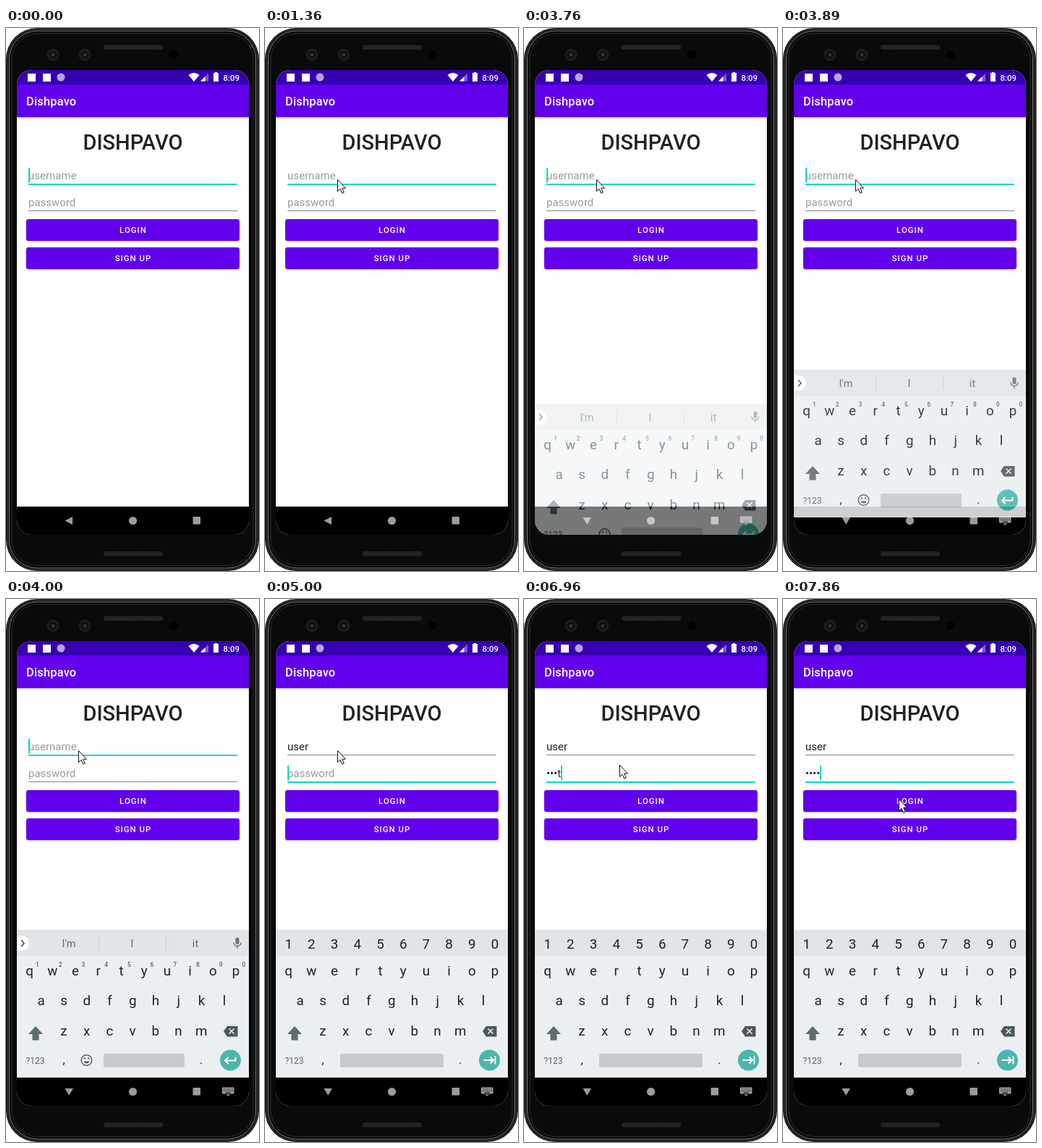
An HTML page for the animation above (8 s loop, 350 by 750 pixels).

```html
<!DOCTYPE html>
<html lang="en">
<head>
<meta charset="utf-8">
<title>Login screen</title>
<style>
  html, body { margin: 0; width: 100%; height: 100%; overflow: hidden; background: #fff; }
  svg { display: block; width: 350px; height: 750px; font-family: Roboto, "Noto Sans", sans-serif; }
  .mid { text-anchor: middle; }
  .medium { font-weight: 500; }
  .field { font-size: 15px; fill: #212121; white-space: pre; }
  .hint { fill: #9b9b9b; }
  .button rect { fill: #6200ee; filter: drop-shadow(0 1px .8px rgba(0, 0, 0, .26)); }
  .button text { fill: #fff; font-size: 11.4px; font-weight: 500; letter-spacing: 1.02px; text-anchor: middle; }
  .key { font-size: 18.8px; fill: #14262e; text-anchor: middle; }
  .sup { font-size: 8.5px; fill: #566268; text-anchor: middle; font-weight: 500; }
  .word { font-size: 14.5px; fill: #5f6a70; text-anchor: middle; }
</style>
</head>
<body>
<svg viewBox="0 0 350 750">
  <defs>
    <clipPath id="screen"><rect x="15" y="58" width="321" height="642" rx="20"/></clipPath>
    <pattern id="mesh" width="3" height="3" patternUnits="userSpaceOnUse">
      <rect width="3" height="3" fill="#151515"/>
      <circle cx=".8" cy=".8" r=".7" fill="#444"/>
      <circle cx="2.3" cy="2.3" r=".7" fill="#383838"/>
    </pattern>
    <linearGradient id="shade" x2="0" y2="1">
      <stop stop-opacity=".25"/>
      <stop offset="1" stop-opacity="0"/>
    </linearGradient>
    <g id="lens">
      <circle r="8.5" fill="#1d1d1d"/>
      <circle r="5.5" fill="#111"/>
      <circle r="2.2" fill="#343434"/>
    </g>
  </defs>

  <!-- Phone body -->
  <rect width="350" height="750" rx="43" fill="#151515"/>
  <rect x="2" y="1.5" width="346" height="747" rx="41" fill="none" stroke="#3c3c3c"/>
  <rect x="4.5" y="4" width="341" height="742" rx="39" fill="#0b0b0b" stroke="#747474"/>
  <rect x="8" y="7.5" width="334" height="735" rx="36" fill="#0a0a0a" stroke="#2c2c2c"/>
  <rect x="135" y="23.5" width="82" height="6.5" rx="3" fill="url(#mesh)"/>
  <rect x="135" y="723" width="82" height="6.5" rx="3" fill="url(#mesh)"/>
  <use href="#lens" x="65" y="37"/>
  <use href="#lens" x="109" y="37"/>
  <circle cx="232" cy="37" r="6" fill="#010101"/>

  <g clip-path="url(#screen)">
    <rect x="15" y="58" width="321" height="642" fill="#fefefe"/>
    <rect x="15" y="123" width="321" height="3" fill="url(#shade)"/>
    <rect x="15" y="58" width="321" height="20" fill="#3700b3"/>
    <rect x="15" y="78" width="321" height="45" fill="#6200ee"/>

    <!-- Status bar -->
    <g fill="#fff">
      <rect x="30" y="63" width="11" height="11"/>
      <rect x="51" y="63" width="11" height="11"/>
      <circle cx="76" cy="68" r="5.5" fill="#b5a3dc"/>
      <path d="M252.5 65Q260 59 267.5 65L260 74Z"/>
      <path d="M280 62.5V73.5H269Z" opacity=".35"/>
      <path d="M275.5 67V73.5H269Z"/>
      <path d="M289 62V61h3v1h2v12h-7V62Z"/>
      <text x="300.500" y="72.500" class="medium" font-size="11.4">8:09</text>
    </g>
    <text x="28" y="107" class="medium" font-size="16.4" letter-spacing=".2" fill="#fff">Dishpavo</text>
    <text x="175.500" y="168" class="medium mid" font-size="29" fill="#212121">DISHPAVO</text>

    <!-- Form -->
    <text id="user" class="field" x="31" y="209"></text>
    <text id="pass" class="field" x="31" y="246"></text>
    <rect id="userLine" x="31" width="289"/>
    <rect id="passLine" x="31" width="289"/>
    <rect id="caret" width="2" height="20.500" fill="#03dac5"/>
    <g class="button">
      <rect x="28" y="264" width="295" height="30" rx="3.300"/>
      <text x="176" y="283">LOGIN</text>
      <rect x="28" y="303" width="295" height="30" rx="3.300"/>
      <text x="176" y="322.300">SIGN UP</text>
    </g>

    <!-- Navigation bar -->
    <rect x="15" y="661" width="321" height="39"/>
    <g fill="#9c9c9c">
      <path id="back"/>
      <circle cx="175.500" cy="680.500" r="5.600"/>
      <rect x="258.500" y="675" width="10.500" height="10.500" rx=".8"/>
      <g id="switcher">
        <rect x="299" y="674.500" width="16.500" height="9" rx="1.200"/>
        <path d="M304.500 684.500h5.500l-2.750 2.300Z"/>
        <path d="M301 677h13M301 679.500h13" stroke="#000" stroke-width="1.200" stroke-dasharray="1.400 1.400"/>
        <path d="M303.500 682h7.500" stroke="#000" stroke-width="1"/>
      </g>
    </g>

    <!-- The keyboard fades in over the navigation bar and rests above it -->
    <g id="keyboard">
      <rect x="15" y="457" width="321" height="204" fill="#ebeff2"/>
      <rect x="15" y="457" width="321" height="36" fill="#e1e5e8"/>
      <g id="letters"></g>

      <g id="textMode">
        <path d="M15 465H21.500a10.500 10.500 0 0 1 0 21H15Z" fill="#fff"/>
        <path d="M21 471l4 4.500-4 4.500" fill="none" stroke="#37474f" stroke-width="1.500"/>
        <path d="M128.500 466v19M221.500 466v19" stroke="#c6cbce"/>
        <g id="words"></g>
        <rect x="317.500" y="467.500" width="5" height="9.500" rx="2.500" fill="#6b767c"/>
        <path d="M315 474.500a5 5 0 0 0 10 0M320 479.500v3.500" fill="none" stroke="#6b767c" stroke-width="1.400"/>
        <g id="sups"></g>
        <circle cx="111.500" cy="637" r="7.300" fill="none" stroke="#546067" stroke-width="1.500"/>
        <g fill="#546067">
          <path d="M107.500 638.500a4.200 4.200 0 0 0 8 0Z"/>
          <circle cx="109" cy="634.500" r="1.200"/>
          <circle cx="114" cy="634.500" r="1.200"/>
        </g>
      </g>
      <g id="digits"></g>

      <path d="M41 590l10 11h-5.500v8.500h-9v-8.500H31Z" fill="#5f6b72"/>
      <path d="M301 597l5-7h14.500v14.500H306Z" fill="#4a575e"/>
      <path d="M308.500 593.500l7 7m0-7l-7 7" stroke="#ebeff2" stroke-width="1.600"/>
      <text x="40.500" y="641.500" class="mid" font-size="12" fill="#546067">?123</text>
      <text x="80" y="641.500" class="key" style="font-size:16px">,</text>
      <text x="270" y="641.500" class="key" style="font-size:16px">.</text>
      <rect id="space" y="628" height="19" rx="2.500" fill="#c6cacc"/>
      <circle cx="310.500" cy="637" r="14.500" fill="#4db6ac"/>
      <path id="action" fill="none" stroke="#fff" stroke-width="1.900"/>
    </g>
  </g>

  <path id="pointer" d="M.5.5V16.500L4.100 13.200 6.700 19.200 9.300 18 6.700 12.200H11.500Z" fill="#fff" stroke="#111" stroke-width="1"/>
</svg>

<script>
const LOOP = 8000, PITCH = 31.7;
const $ = id => document.getElementById(id);

// Each track holds [start ms, ...values]; a value stays until the next start.
const pointerTrack = [
  [130, 283, 599], [250, 236, 503], [370, 176, 368], [490, 132, 280], [610, 113, 243],
  [760, 109, 234], [880, 106, 225], [1000, 103, 217], [1120, 101, 212], [1240, 100, 210],
  [1360, 100, 209], [6960, 132, 229], [7110, 150, 241], [7230, 158, 249], [7350, 161, 254],
  [7490, 161, 259], [7610, 161, 266], [7730, 160, 272], [7860, 160, 276]
];
const caretTrack = [
  [0, 1], [370, 0], [880, 1], [1360, 0], [1860, 1], [2360, 0], [2860, 1], [3360, 0],
  [3500, 1], [6350, 0], [6960, 1], [7350, 0], [7860, 1]
];
const slideTrack = [[0, 0, 0], [3630, 108, .16], [3760, 62, .5], [3890, 15, .87], [4000, 0, 1]];
const userTrack = [[0, ""], [4250, "u"], [4380, "use"], [4510, "user"]];
const passTrack = [[0, ""], [5490, "p"], [5610, "•a"], [5730, "••c"], [5850, "•••t"], [7350, "••••"]];
const wordTrack = [
  [0, "I'm", "I", "it"], [4250, "you", "u", "us"], [4380, "uses", "use", "used"], [4510, "users", "user", "used"]
];
const TAB_TIME = 5000;

function at(track, t) {
  let hit = null;
  for (const step of track) if (step[0] <= t) hit = step;
  return hit;
}

function set(id, attrs) {
  for (const name in attrs) $(id).setAttribute(name, attrs[name]);
}

function addText(parent, text, x, y, cls) {
  const el = document.createElementNS("http://www.w3.org/2000/svg", "text");
  el.setAttribute("x", x);
  el.setAttribute("y", y);
  el.setAttribute("class", cls);
  el.textContent = text;
  $(parent).append(el);
}

function addRow(parent, chars, x, y, cls = "key") {
  [...chars].forEach((c, i) => addText(parent, c, x + i * PITCH, y, cls));
}

addRow("letters", "qwertyuiop", 32.7, 520);
addRow("letters", "asdfghjkl", 48.5, 561);
addRow("letters", "zxcvbnm", 80, 602.5);
addRow("sups", "1234567890", 43.5, 507.5, "sup");
addRow("digits", "1234567890", 32.7, 482.5);
[87, 174.5, 262].forEach(x => addText("words", "", x, 480.5, "word"));

function fill(id, value, hint) {
  const el = $(id);
  el.textContent = value || hint;
  el.classList.toggle("hint", !value);
  return value ? el.getComputedTextLength() : 0;
}

function underline(id, y, focused) {
  set(id, focused
    ? { y, height: 2, fill: "#03dac5" }
    : { y, height: 1, fill: "#858585" });
}

function show(id, on) {
  $(id).style.display = on ? "" : "none";
}

function draw(t) {
  const onPass = t >= TAB_TIME;
  const userWidth = fill("user", at(userTrack, t)[1], "username");
  const passWidth = fill("pass", at(passTrack, t)[1], "password");
  underline("userLine", 215, !onPass);
  underline("passLine", 252, onPass);
  set("caret", {
    x: Math.round(31 + (onPass ? passWidth : userWidth)),
    y: onPass ? 230 : 193,
    opacity: at(caretTrack, t)[1]
  });

  const [, drop, alpha] = at(slideTrack, t);
  set("keyboard", { transform: `translate(0 ${drop})`, opacity: alpha });
  const words = at(wordTrack, t).slice(1);
  [...$("words").children].forEach((el, i) => { el.textContent = words[i]; });
  show("textMode", !onPass);
  show("digits", onPass);
  set("space", onPass ? { x: 104, width: 143 } : { x: 135, width: 112 });
  set("action", {
    d: onPass
      ? "M302.500 637h13M311.500 632.500l4.500 4.500-4.500 4.500M318.500 631.500v11"
      : "M317.500 633v4.500h-14M307.500 633l-4.500 4.500 4.500 4.500"
  });
  set("back", { d: alpha ? "M81.500 676h11.500l-5.750 9.800Z" : "M92 675v11l-10.500-5.500Z" });
  show("switcher", alpha > 0);

  const spot = at(pointerTrack, t);
  show("pointer", spot);
  if (spot) set("pointer", { transform: `translate(${spot[1]} ${spot[2]})` });
}

let start;
function tick(now) {
  start ??= now;
  draw((now - start) % LOOP);
  requestAnimationFrame(tick);
}
draw(0);
requestAnimationFrame(tick);
</script>
</body>
</html>
```
